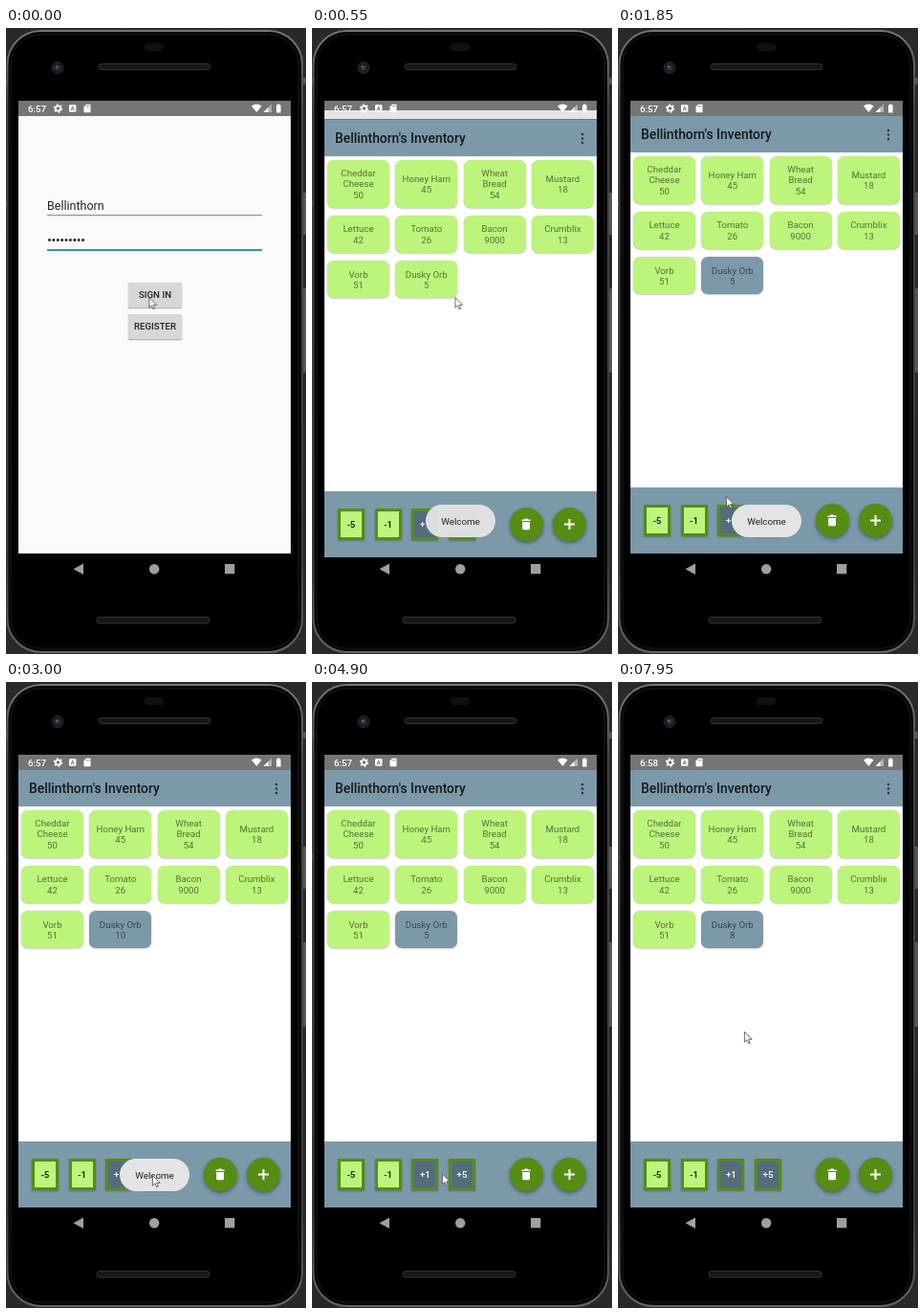
Animation of 314x654 px, one loop 8000 ms. Source, as an HTML page:

```html
<!DOCTYPE html>
<html lang="en">
<head>
<meta charset="utf-8">
<title>Inventory app</title>
<style>
  :root { --lime: #bdf47b; --slate: #7c99a9; --green: #568d13; }
  html, body { margin: 0; width: 100%; height: 100%; overflow: hidden; background: #292929; }
  body { position: relative; font: 9.7px/11.3px Roboto, sans-serif; color: #222; }
  body *, body *::after { box-sizing: border-box; animation: 8s linear infinite; }
  svg, .abs, .abs > * { position: absolute; }
  svg { left: 0; top: 0; overflow: visible; }

  /* windows */
  .screen { left: 13px; top: 76px; width: 285px; height: 473px; background: #757575; overflow: hidden; }
  .login { left: 0; top: 16px; width: 285px; height: 470px; background: #fafafa; animation-name: leave; }
  .login > * { position: absolute; left: 30px; width: 225px; }
  .user { top: 86px; height: 18px; font-size: 12.5px; line-height: 15px; border-bottom: 1px solid #8b8b8b; }
  .pass { top: 123px; height: 18px; border-bottom: 2px solid #3c8fa9; }
  .pass i { position: absolute; left: 1px; top: 5px; width: 39px; height: 3px;
    background: radial-gradient(circle at 1.5px 1.5px, #222 1.1px, transparent 1.7px) 0 0 / 4.4px 3px; }
  .login b { left: 115px; width: 56px; height: 26px; background: #d6d7d7; border-radius: 1px;
    font-weight: 500; line-height: 26px; text-align: center; box-shadow: 0 1px 1.5px #0005; }
  .shade { inset: 0; left: 0 !important; width: auto !important; background: #000; opacity: 0; animation-name: shade; }

  .reveal { left: 13px; top: 76px; width: 285px; height: 495px; overflow: hidden; animation-name: reveal; }
  .home { left: 0; top: 0; width: 285px; height: 473px; background: #fff; animation-name: rise; }
  .strip { left: 0; top: 0; width: 285px; height: 16px; background: #757575; }
  .title { left: 0; top: 16px; width: 285px; height: 38px; padding-left: 11px; background: var(--slate);
    color: #17191b; font-size: 13.87px; font-weight: 500; line-height: 39px; }
  .grid { left: 3px; top: 58px; display: grid; grid-template: 50px 39px 39px / repeat(4, 65px); gap: 8.2px 6.3px; }
  .grid p { margin: 0; display: flex; flex-direction: column; justify-content: center; text-align: center;
    border-radius: 7px; background: var(--lime); color: #0000008a; box-shadow: 0 .5px 1.5px #0005; }
  .grid .picked { animation-name: pick; }
  .picked::after { content: "5"; animation: count 8s step-end infinite; }
  .bar { left: 0; top: 404px; width: 285px; height: 69px; background: var(--slate); }
  .bar b { position: absolute; top: 18px; width: 28px; height: 33px; border: 3px solid var(--green); background: var(--lime);
    color: #111; font-weight: 500; line-height: 28px; text-align: center; box-shadow: 0 1px 2px #0004; }
  .bar .plus { background: #536d7d; color: #fff; }
  .fab { top: 17px; width: 35px; height: 35px; border-radius: 50%; background: var(--green); box-shadow: 0 2px 4px #0006; }

  .toast { left: 119px; top: 498px; width: 73px; height: 34px; border-radius: 17px; background: #e4e4e4;
    color: #222; line-height: 35px; text-align: center; font-size: 9.8px; animation-name: toast; }
  .clock { left: 23px; top: 78px; color: #fff; font-weight: 500; line-height: 13px; }
  .clock::after { content: "6:57"; animation: clock 8s step-end infinite; }
  .cursor { animation-name: move; }

  @keyframes leave {
    0%, 4.125% { transform: none; animation-timing-function: cubic-bezier(.4,0,.2,1); }
    9.44%, 100% { transform: translateY(-8px); }
  }
  @keyframes shade { 0%, 4.125% { opacity: 0 } 5.625%, 100% { opacity: .085 } }
  @keyframes reveal {
    0%, 4.125% { clip-path: inset(495px 0 0); animation-timing-function: cubic-bezier(.4,0,.8,.8); }
    5.625% { clip-path: inset(136px 0 0); animation-timing-function: cubic-bezier(.1,.7,.2,1); }
    9.3%, 100% { clip-path: inset(0); }
  }
  @keyframes rise {
    0%, 4.125% { transform: translateY(22px); animation-timing-function: cubic-bezier(.4,0,.2,1); }
    9.3%, 100% { transform: none; }
  }
  @keyframes toast {
    0%, 4.4% { opacity: 0 } 7%, 49% { opacity: 1 } 54%, 100% { opacity: 0 }
  }
  @keyframes pick {
    0%, 15.6% { background: var(--lime) } 15.7%, 100% { background: var(--slate) }
  }
  @keyframes count {
    0% { content: "5" } 36.25% { content: "10" } 51.875% { content: "5" }
    66.875% { content: "10" } 74.375% { content: "5" }
    82.5% { content: "6" } 85.625% { content: "7" } 88.75% { content: "8" } 100% { content: "8" }
  }
  @keyframes clock { 0% { content: "6:57" } 96.5%, 100% { content: "6:58" } }
  @keyframes move {
    0%, 12.5% { transform: translate(149.5px, 281px) }
    15%, 17.5% { transform: translate(127px, 266px) }
    23.125% { transform: translate(113px, 489px) }
    27% { transform: translate(122px, 512px) }
    32%, 38% { transform: translate(153px, 515px) }
    46.5% { transform: translate(47px, 512px) }
    49.375%, 55% { transform: translate(45px, 511px) }
    62.5%, 68.5% { transform: translate(154px, 514px) }
    73%, 76% { transform: translate(41px, 513px) }
    78.125% { transform: translate(87px, 513px) }
    80.5%, 95.6% { transform: translate(122px, 515px) }
    99.375%, 100% { transform: translate(132px, 365px) }
  }
</style>
</head>
<body>
<svg width="314" height="654">
  <defs>
    <linearGradient id="rim" x2="0" y2="1">
      <stop stop-color="#777"/><stop offset=".12" stop-color="#444"/>
      <stop offset=".85" stop-color="#3a3a3a"/><stop offset="1" stop-color="#666"/>
    </linearGradient>
  </defs>
  <path d="M309 172h5v44h-5zM309 272h5v88h-5z" fill="#555"/>
  <path d="M0 52h3v7H0zM0 180h3v6H0zM311 52h3v7h-3z" fill="#555"/>
  <rect x="1.5" y="3" width="308.5" height="649" rx="35" fill="#060606" stroke="url(#rim)" stroke-width="2"/>
  <rect x="5" y="7" width="301" height="641" rx="31" fill="#000" stroke="#191919"/>
  <rect x="145" y="16" width="20" height="8" rx="3" fill="#111"/>
  <g fill="#171717" stroke="#333">
    <rect x="97" y="37.5" width="117" height="6" rx="3"/>
    <rect x="95" y="615.5" width="118" height="6.5" rx="3"/>
  </g>
  <circle cx="54" cy="41.5" r="6" fill="#1b1d20" stroke="#292929"/>
  <circle cx="54" cy="41.5" r="2.8" fill="#263a50"/>
  <circle cx="53" cy="40.5" r="1" fill="#5c7d9d"/>
</svg>

<div class="abs screen">
  <div class="login">
    <div class="user">Bellinthorn</div>
    <div class="pass"><i></i></div>
    <b style="top:174px">SIGN IN</b>
    <b style="top:207px">REGISTER</b>
    <div class="shade"></div>
  </div>
</div>

<div class="abs reveal">
  <div class="abs home">
    <div class="strip"></div>
    <div class="title">Bellinthorn's Inventory</div>
    <svg width="285" height="60" fill="#333">
      <circle cx="270" cy="31" r="1.3"/><circle cx="270" cy="35.5" r="1.3"/><circle cx="270" cy="40" r="1.3"/>
    </svg>
    <div class="grid">
      <p>Cheddar<br>Cheese<br>50</p><p>Honey Ham<br>45</p><p>Wheat<br>Bread<br>54</p><p>Mustard<br>18</p>
      <p>Lettuce<br>42</p><p>Tomato<br>26</p><p>Bacon<br>9000</p><p>Crumblix<br>13</p>
      <p>Vorb<br>51</p><p class="picked"><span>Dusky Orb</span></p>
    </div>
    <div class="abs bar">
      <b style="left:14px">-5</b><b style="left:52.7px">-1</b>
      <b class="plus" style="left:91.4px">+1</b><b class="plus" style="left:130px">+5</b>
      <div class="fab" style="left:193.5px"></div>
      <div class="fab" style="left:239px"></div>
      <svg width="285" height="69" fill="#fff">
        <path d="M206.5 29.5h2.5l.8-1h2.6l.8 1h2.5v1.5h-9.2zM207.2 32h7.8v7a1.3 1.3 0 0 1-1.3 1.3h-5.2a1.3 1.3 0 0 1-1.3-1.3z"/>
        <path d="M251 34.5h11M256.500 29v11" stroke="#fff" stroke-width="2"/>
      </svg>
    </div>
  </div>
</div>

<svg width="314" height="654" fill="#9f9f9f">
  <path d="M81 559.500v11.500L70.500 565.200z"/>
  <circle cx="155.200" cy="565.200" r="5.200"/>
  <rect x="229" y="560" width="10.300" height="10.300"/>
  <g fill="#fff">
    <circle cx="54.500" cy="84" r="2.700" fill="none" stroke="#fff" stroke-width="1.800"/>
    <circle cx="54.500" cy="84" r="4.100" fill="none" stroke="#fff" stroke-width="1.300" stroke-dasharray="1.900 2.390"/>
    <rect x="66" y="80.300" width="7.400" height="7.400" rx="1"/>
    <path d="M68 86.300l1.700-4.400 1.700 4.400M68.600 85h2.200" fill="none" stroke="#757575" stroke-width=".9"/>
    <path d="M84 79.700h4.500v8.600h-7v-6z"/>
    <path d="M84 81v1.500M85.500 81v1.500M87 81v1.500" stroke="#757575" stroke-width=".7"/>
    <path d="M257 81.500q5.300-3.800 10.600 0l-5.300 6.500z"/>
    <path d="M278 79.500v8.500h-8.500z" opacity=".45"/>
    <path d="M274.500 83v5h-5z"/>
    <path d="M283 80.500h1.200v-1h2.200v1h1.200v8H283z"/>
  </g>
</svg>
<div class="abs clock"></div>
<div class="abs toast">Welcome</div>
<svg class="cursor" width="10" height="14">
  <path d="M.4.500v10.700l2.500-2.300 1.700 3.900 1.700-.7-1.700-3.800h3.500z" fill="#fff" stroke="#444" stroke-width=".8"/>
</svg>
</body>
</html>
```
